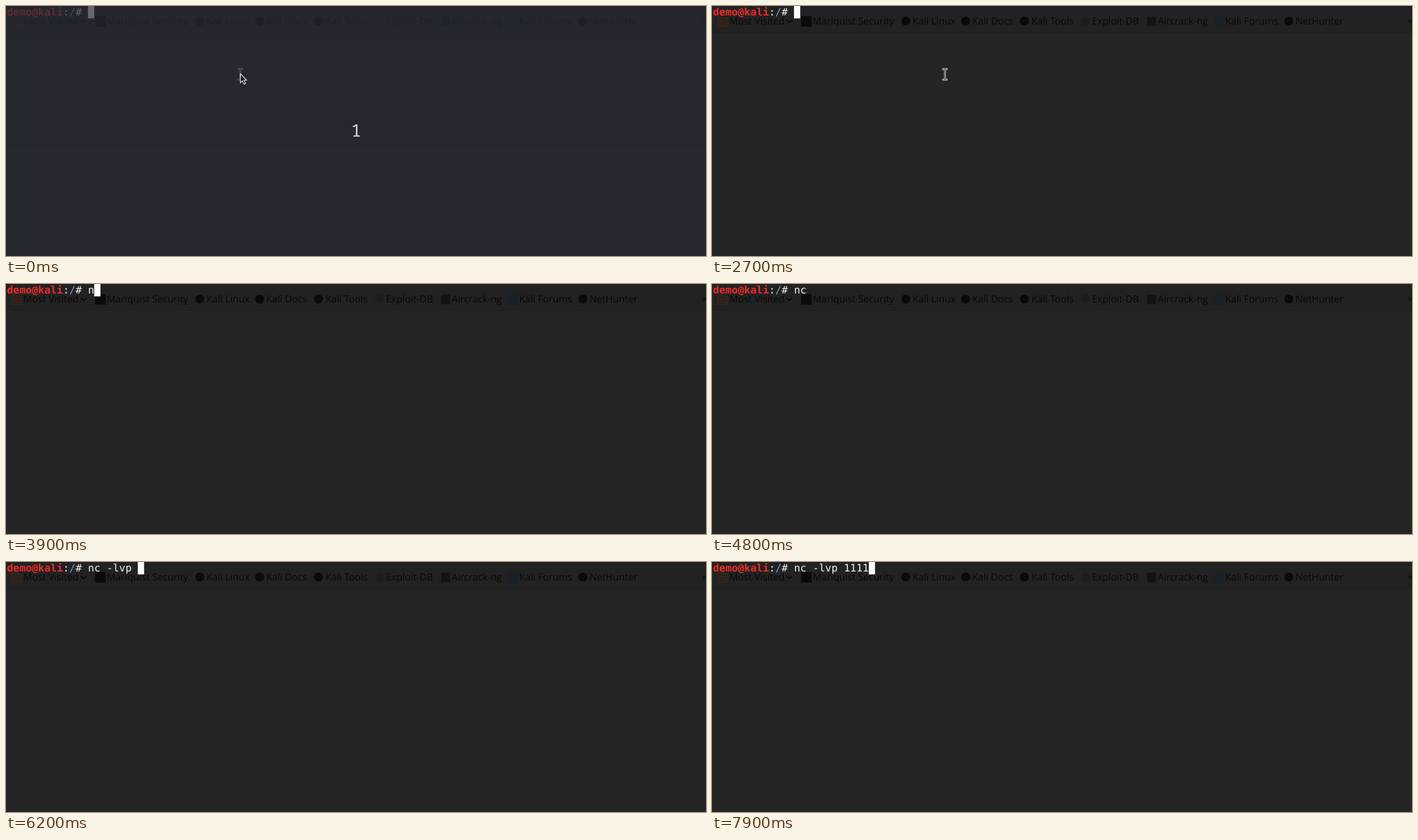
Write an HTML page that moves like this. It is 1250 by 448 pixels and loops after 8 s.

```html
<!DOCTYPE html>
<html lang="en">
<head>
<meta charset="utf-8">
<title>Terminal session</title>
<style>
  html, body { margin: 0; width: 100%; height: 100%; overflow: hidden; background: #252525; }
  svg { display: block; width: 100%; height: 100%; }
  text { text-rendering: geometricPrecision; }
  .bar { font: 17.3px "Open Sans", "Noto Sans", sans-serif; fill: #080808; }
  .term { font: 18.49px "DejaVu Sans Mono", monospace; fill: #eeeeec; white-space: pre; }
  .user { font-weight: bold; fill: #ef2929; }
  .path { fill: #729fcf; }
  .count { font: 30.5px "Noto Sans Mono", monospace; fill: #dedede; text-anchor: middle; }
  .beam path { fill: none; stroke-linecap: square; }
</style>
</head>
<body>
<svg viewBox="0 0 1250 448">
  <rect width="1250" height="448" fill="#252525"/>
  <rect width="1250" height="47" fill="#222"/>
  <rect y="47" width="1250" height="1" fill="#1d1d1d"/>

  <g class="bar">
    <g fill="none" stroke="#48250f" stroke-width="1.6">
      <path d="M10.8 19.8h6l2 2h9v14.5h-17z"/>
      <path d="M14.5 33v-6.5h9.5v6.5h-5v-3"/>
    </g>
    <path d="M133.5 25l5 4.5 5-4.5" fill="none" stroke="#080808" stroke-width="2"/>
    <rect x="159" y="18" width="19" height="19" fill="#0b0b0b"/>
    <g id="dots" fill="#0a0a0a"></g>
    <circle cx="667" cy="27" r="8" fill="#1f1d1c"/>
    <rect x="777" y="19" width="16" height="17" fill="#121315"/>
    <rect x="896" y="18" width="19" height="19" fill="#1a2129"/>
    <g id="links"></g>
    <text x="1242.5" y="32">»</text>
  </g>

  <text class="term" x="1.7" y="17"><tspan class="user">demo@kali</tspan>:<tspan class="path">/</tspan>#</text>
  <text class="term" id="typed" x="146.4" y="17"></text>
  <rect id="block" width="11.13" height="22.2" fill="#fff"/>

  <g class="beam" id="beam">
    <path d="M-3 113H3M0 113V132M-3 132H3" stroke="#f4f4f4" stroke-width="3"/>
    <path d="M-3 113H3M0 113V132M-3 132H3" stroke="#1a1a1a" stroke-width="1.2"/>
  </g>

  <g id="intro">
    <rect width="1250" height="448" fill="rgb(38,42,52)" fill-opacity=".7"/>
    <path d="M418.5 121.5v16l3.7-3.5 3 6.3 2.8-1.3-3-6h4.7z" fill="#15171b" stroke="#f2f2f2" stroke-width="1.2"/>
    <text class="count" x="625.5" y="234">1</text>
  </g>
</svg>
<script>
  const LOOP = 8000, CELL = 11.13, LEFT = 146.4;
  const COMMAND = "nc -lvp 1111";
  const KEYS = [3900, 4000, 4100, 4900, 5300, 5800, 6100, 6200, 7400, 7500, 7700, 7900];
  const BLINKS = [[4800, 4900], [6800, 7400]];
  const BEAM = [[0, 418.5], [2700, 416], [2800, 409], [2900, 399], [3000, 394.5], [3300, 393.5]];
  const BEAM_HIDDEN = 3800;
  const LINKS = [
    [31, "Most Visited"], [180, "Marlquist Security"], [358, "Kali Linux"],
    [464.5, "Kali Docs"], [570.5, "Kali Tools"], [678.5, "Exploit-DB"],
    [796, "Aircrack-ng"], [916.5, "Kali Forums"], [1042, "NetHunter"]
  ];

  const get = id => document.getElementById(id);
  const show = (el, on) => el.setAttribute("visibility", on ? "visible" : "hidden");

  function add(parent, tag, attrs, text = "") {
    const el = document.createElementNS(parent.namespaceURI, tag);
    for (const key in attrs) el.setAttribute(key, attrs[key]);
    el.textContent = text;
    parent.append(el);
  }

  for (const [x, label] of LINKS) add(get("links"), "text", { x, y: 33 }, label);
  for (const cx of [346, 453, 558, 1030]) add(get("dots"), "circle", { cx, cy: 27, r: 8 });

  const typed = get("typed"), block = get("block"), beam = get("beam"), intro = get("intro");

  function draw(t) {
    const count = KEYS.filter(k => k <= t).length;
    typed.textContent = COMMAND.slice(0, count);
    block.setAttribute("x", LEFT + count * CELL);
    show(block, !BLINKS.some(([from, to]) => t >= from && t < to));

    const x = BEAM.filter(([at]) => at <= t).pop()[1];
    beam.setAttribute("transform", `translate(${x} 0)`);
    show(beam, t < BEAM_HIDDEN);
    show(intro, t < 100);
  }

  const start = performance.now();
  function tick() {
    draw((performance.now() - start) % LOOP);
    requestAnimationFrame(tick);
  }
  tick();
</script>
</body>
</html>
```
